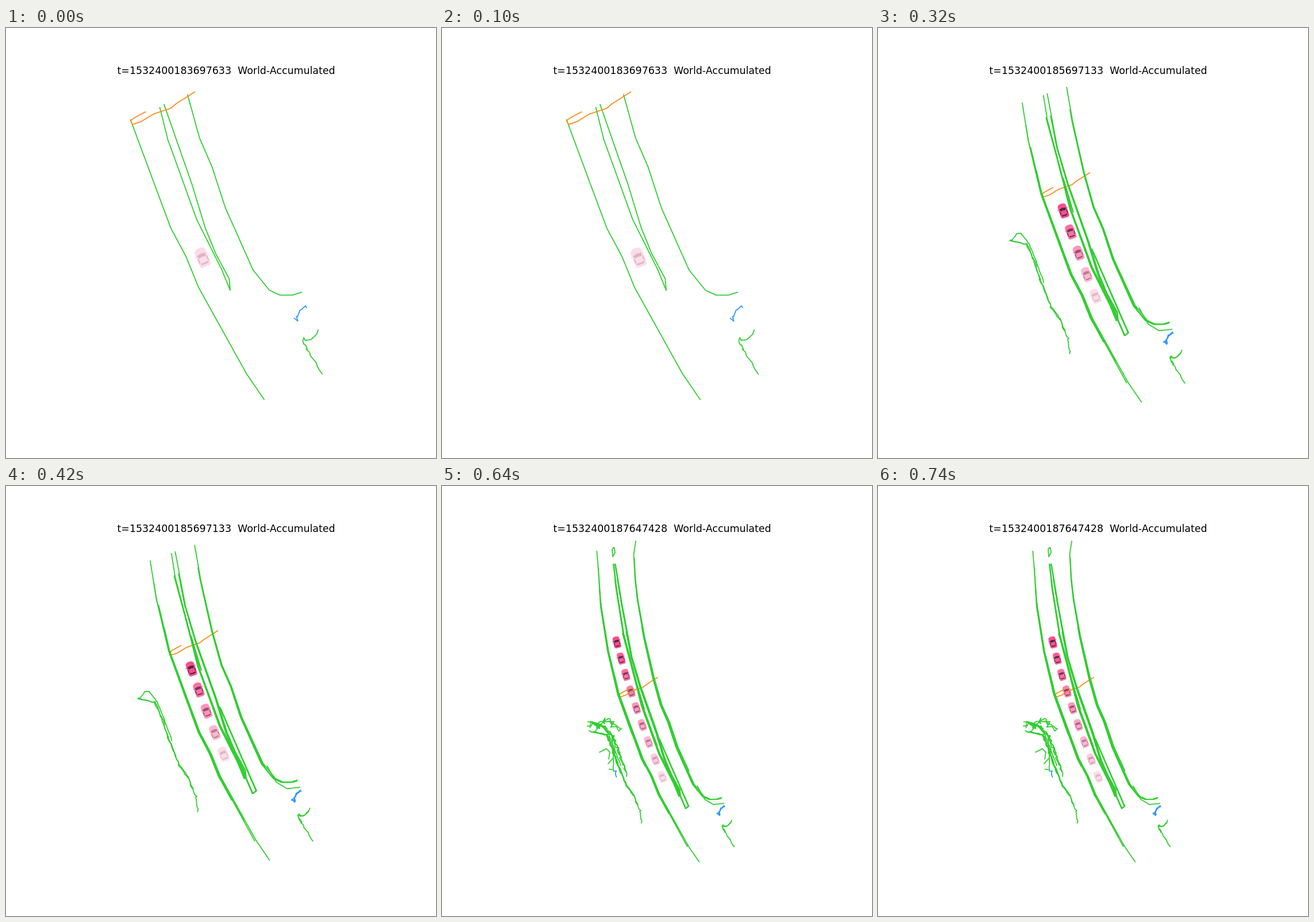
Recreate the animation shown at these times as an HTML page with a canvas. Size 748x748 px, loop 800 ms.

```html
<!DOCTYPE html>
<html>
<head>
<meta charset="utf-8">
<style>
html, body { margin: 0; height: 100%; overflow: hidden; background: #fff; }
canvas { display: block; }
</style>
</head>
<body>
<canvas width="748" height="748"></canvas>
<script>
const ctx = document.querySelector('canvas').getContext('2d');
const STEP = 160;
const GREEN = '#32cd32', BLUE = '#2d96ff', ORANGE = '#ff8c1e';
const RANGE = 162, REACH = 83; // scan window: half length, half width

// World units are pixels of the widest view; ANCHOR is the lower road end.
const ANCHOR = { x: 448, y: 655 };
const views = [
  { stamp: '1532400183697633', x: 450, y: 648, zoom: 1.667 },
  { stamp: '1532400184697364', x: 454, y: 650, zoom: 1.433 },
  { stamp: '1532400185697133', x: 459, y: 652, zoom: 1.243 },
  { stamp: '1532400186647118', x: 454, y: 654, zoom: 1.108 },
  { stamp: '1532400187647428', x: 448, y: 655, zoom: 1 }
];

// Map lines: key points, the scans that see them, sideways error, roughness.
const map = [
  { keys: '268,100 272,142 277,210 290,288 308,362 331,424 350,475 366,505 379,537 404,582 429,627 455,665', spread: -4 },
  { keys: '298,136 303,180 315,258 339,351 347,383 359,416 377,466 403,518 412,540 411,528 397,502 386,475 372,429 358,389 343,346 329,298 312,205 301,136', spread: 4 },
  { keys: '396,500 422,561 427,557 400,494 377,440', from: 1, to: 3, spread: 4 },
  { keys: '338,341 352,388 344,367', from: 3, to: 4 },
  { keys: '299,107 296,110 297,123 301,116 300,108', from: 8 },
  { keys: '338,94 334,118 336,160 340,198 351,262 367,334 380,381 393,411 407,454 423,490 436,519 453,540 464,545 477,545 496,539', spread: 4 },
  { keys: '444,522 457,545 472,554 492,552', from: 1, to: 1 },
  { keys: '504,582 497,591 491,592 489,590 487,592 492,601 508,627', to: 1, rough: 1, spread: 2 },
  { keys: '495,555 491,557 485,561 482,567 482,572 478,570', to: 2, rough: 1.2, spread: 2, color: BLUE },
  { keys: '250,424 266,428 289,433 298,454 307,482 323,521 335,537 347,565 350,590', from: 3, rough: 1, spread: -4 },
  { keys: '266,428 273,418 279,418 290,432 303,465 311,487', from: 3, to: 3, rough: .6 },
  { keys: '250,408 283,419 297,436 310,470 321,503', from: 5, rough: 2.5 },
  { keys: '250,420 272,415 285,408 296,414 309,426', from: 7, rough: 7 },
  { keys: '296,437 298,475 298,493 291,493', from: 5, to: 5, rough: .6 },
  { keys: '298,473 289,483', from: 6, to: 6 },
  { keys: '274,463 286,457 292,463 290,475', from: 7, to: 7 },
  { keys: '298,496 303,496 302,502 304,506', from: 5, to: 5, rough: .6, color: BLUE },
  { keys: '304,517 307,514 311,514 313,519 311,526 312,533', from: 6, to: 6, rough: .6, color: BLUE },
  { keys: '308,363 312,360 327,352 358,338 374,331 375,333 356,345 350,350 332,356 319,364 310,367 308,363', to: 0, color: ORANGE }
];

let seed = 7;
const random = () => (seed = seed * 16807 % 2147483647) / 2147483647;
const wobble = size => (random() - .5) * 2 * size;

// The car slows down a little as the road bends.
function carAt(scan) {
  return {
    x: 383 - 12.6 * scan + .34 * scan ** 2,
    y: 505.6 - 30.5 * scan + .16 * scan ** 2,
    heading: Math.atan2(-12.6 + .68 * scan, 30.5 - .32 * scan)
  };
}

function subdivide(keys, gap) {
  const points = keys.split(' ').map(key => key.split(',').map(Number));
  return points.slice(1).flatMap(([x, y], i) => {
    const [px, py] = points[i];
    const count = Math.ceil(Math.hypot(x - px, y - py) / gap);
    return Array.from({ length: count + 1 }, (_, j) =>
      [px + (x - px) * j / count, py + (y - py) * j / count]);
  });
}

// The part of a map line inside the turned window around the car.
function detect({ keys, rough = 0, spread = 0 }, scan, car) {
  const path = new Path2D(), sin = Math.sin(car.heading), cos = Math.cos(car.heading);
  const shift = scan && spread && wobble(.7);
  const drift = scan && spread * random();
  let drawing = false;
  for (const [x, y] of subdivide(keys, rough ? 5 : 2)) {
    const dx = x - car.x, dy = y - car.y;
    const ahead = dx * sin - dy * cos, side = dx * cos + dy * sin;
    const inside = Math.abs(ahead) <= RANGE + 1 && Math.abs(side) <= REACH;
    const px = x + shift + drift * (RANGE - ahead) / (2 * RANGE) + wobble(rough);
    const py = y + wobble(rough);
    if (inside) path[drawing ? 'lineTo' : 'moveTo'](px, py);
    drawing = inside;
  }
  return path;
}

const scans = Array.from({ length: 9 }, (_, scan) => {
  const car = carAt(scan);
  const lines = map
    .filter(({ from = 0, to = 8 }) => scan >= from && scan <= to)
    .map(line => ({ color: line.color || GREEN, path: detect(line, scan, car) }));
  return { car, lines };
});

const body = new Path2D('M-10,-11Q-9,-17 0,-17Q9,-17 10,-11V-6L13,-4 12,-3 10,-4V12Q10,17 5,17H-5Q-10,17 -10,12V-4L-12,-3 -13,-4 -10,-6Z');
const windows = new Path2D('M-8,-5Q0,-9 8,-5L6,0Q0,-2 -6,0ZM-6,9Q0,11 6,9L7,12Q0,14 -7,12ZM-9,-2L-7,2V7L-9,10ZM9,-2L7,2V7L9,10Z');

function drawCar({ x, y, heading }, alpha) {
  ctx.save();
  ctx.globalAlpha = alpha;
  ctx.translate(x, y);
  ctx.rotate(heading);
  ctx.scale(.6, .6);
  ctx.fillStyle = '#fb4e8c';
  ctx.fill(body);
  ctx.fillStyle = '#552542';
  ctx.fill(windows);
  ctx.restore();
}

function draw(index) {
  const { stamp, x, y, zoom } = views[index];
  const shown = scans.slice(0, 2 * index + 1);
  ctx.resetTransform();
  ctx.fillStyle = '#fff';
  ctx.fillRect(0, 0, 748, 748);
  ctx.fillStyle = '#000';
  ctx.fillText(`t=${stamp}\u00a0 World-Accumulated`, 383, 79.5);

  ctx.setTransform(zoom, 0, 0, zoom, x - ANCHOR.x * zoom, y - ANCHOR.y * zoom);
  ctx.lineWidth = 1.8 / zoom;
  shown.forEach(({ car }, i) => drawCar(car, .2 + .8 * i / Math.max(1, 2 * index)));
  for (const { color, path } of shown.flatMap(scan => scan.lines)) {
    ctx.strokeStyle = color;
    ctx.stroke(path);
  }
}

ctx.font = '17.4px "DejaVu Sans", sans-serif';
ctx.textAlign = 'center';
ctx.lineJoin = 'round';
ctx.lineCap = 'round';

const start = performance.now();
function tick() {
  draw(Math.floor((performance.now() - start) / STEP) % views.length);
  requestAnimationFrame(tick);
}
tick();
</script>
</body>
</html>
```
